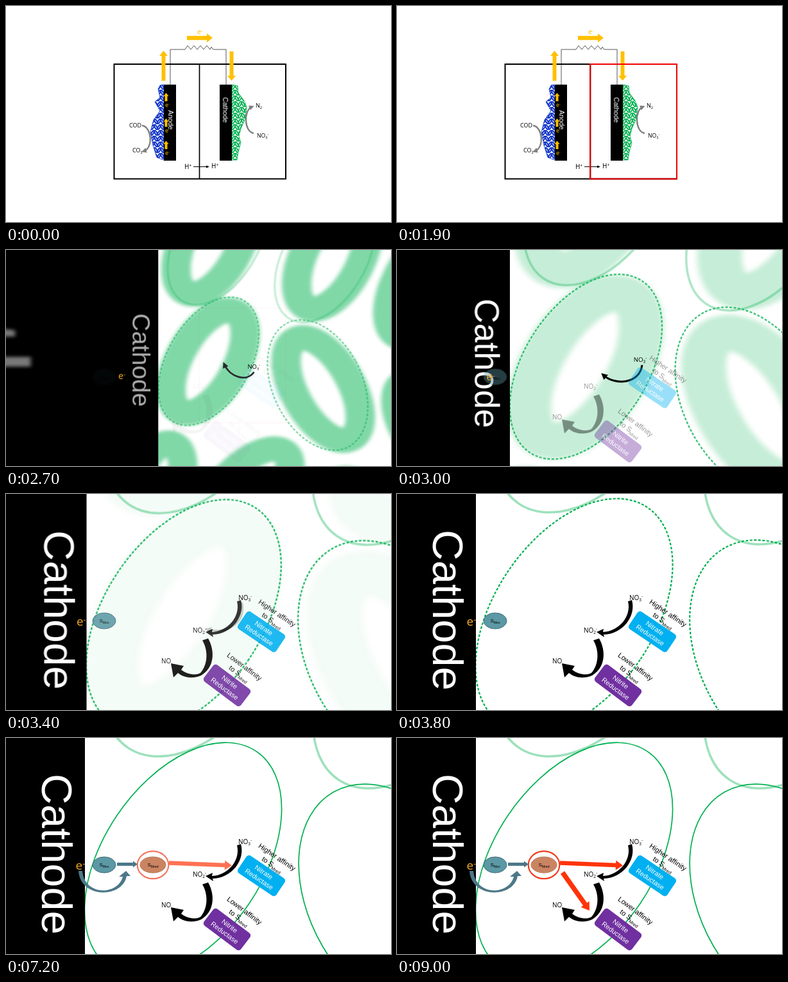
Recreate the animation shown at these times as an HTML page. Size 600 px wide and 338 px high, loop 9.1 s.

```html
<!DOCTYPE html>
<html lang="en">
<head>
<meta charset="utf-8">
<title>Cathode electron transfer</title>
<style>
html, body { margin: 0; width: 100%; height: 100%; overflow: hidden; background: #fff; }
svg { display: block; width: 600px; height: 338px; }
text { font-family: "Liberation Sans", Arial, sans-serif; }
.chem { font-family: "Open Sans", "Noto Sans", sans-serif; }
.sub { font-size: 65%; }
.orange { fill: #ffc000; }
.mid { text-anchor: middle; }
.anim { animation: 9.1s linear infinite; }

/* One shared zoom between two poses, 1900 to 3500 ms */
.morph { animation-name: morph; transform: var(--from); }
@keyframes morph {
  0%, 20.879% { transform: var(--from); animation-timing-function: cubic-bezier(.333, 0, .667, 1); }
  38.462%, 100% { transform: translate(0px, 0px) scale(1, 1); }
}
.zoom { --from: translate(351.6px, 139.8px) scale(.01495, .096); }
.block { --from: translate(350px, 165.5px) scale(.01595, .085); }
.name { --from: translate(329.2px, 133.8px) scale(.159); }
.nitrate { --from: translate(76px, 61.6px) scale(.87); }
.electron { --from: translate(187.5px, 95px) scale(.5); }

.old { animation-name: old; }
@keyframes old { 0%, 20.879% { opacity: 1; } 24.2%, 100% { opacity: 0; } }
.ghost { animation-name: ghost; }
@keyframes ghost { 0%, 20.879% { opacity: 1; } 26.374% { opacity: .2; } 29.67%, 100% { opacity: 0; } }
.frame { animation-name: frame; }
@keyframes frame {
  0%, .5% { opacity: 0; }
  7.692%, 20.879% { opacity: 1; stroke-width: 2; }
  26.374% { opacity: .6; stroke-width: .8; }
  30%, 100% { opacity: 0; stroke-width: .8; }
}
.blobs { animation-name: blobs; }
@keyframes blobs {
  0%, 20.879% { opacity: 0; }
  22.527% { opacity: .95; }
  26.374% { opacity: .77; }
  32.967% { opacity: .23; }
  38.462%, 100% { opacity: 0; }
}
.rims { animation-name: rims; }
@keyframes rims {
  0%, 20.879% { opacity: 0; }
  26.374% { opacity: .23; }
  32.967% { opacity: .85; }
  38.462%, 100% { opacity: 1; }
}
.crisp { animation-name: crisp; }
@keyframes crisp {
  0%, 43.95% { stroke-dasharray: 4 2.5; stroke-width: 2.2; }
  43.956%, 100% { stroke-dasharray: none; stroke-width: 1.7; }
}
.dim { animation-name: dim; }
@keyframes dim { 0%, 20.879% { opacity: 1; } 26.374% { opacity: .35; } 32.967%, 100% { opacity: 1; } }
.final { animation-name: final; }
@keyframes final { 0%, 29.3% { opacity: 0; } 38.462%, 100% { opacity: 1; } }
.glow { animation-name: glow; }
@keyframes glow { 0%, 20.879% { opacity: 0; } 25%, 100% { opacity: 1; } }
.bend { animation-name: bend; }
@keyframes bend {
  0%, 20.879% { d: path("M386 199C371 197 370 163 383 158"); stroke: #7f7f7f; stroke-width: 2.3; opacity: 1; }
  26.374% { d: path("M391 202C372 205 358 185 359 163"); stroke: #555; stroke-width: 2.5; }
  32.967% { d: path("M382 180C378 210 340 212 322 196"); stroke: #000; stroke-width: 3; opacity: 1; }
  38.462%, 100% { d: path("M364 167C374 200 345 222 313 216"); stroke: #000; stroke-width: 3; opacity: 0; }
}
.swoosh { animation-name: swoosh; }
@keyframes swoosh { 0%, 33.5% { opacity: 0; } 38.462%, 100% { opacity: 1; } }

/* Later fades */
.reduce { animation-name: reduce; }
@keyframes reduce { 0%, 55% { opacity: 0; } 59.9%, 100% { opacity: 1; } }
.upper { animation-name: upper; }
@keyframes upper { 0%, 74.2% { opacity: 0; } 81.3%, 100% { opacity: 1; } }
.lower { animation-name: lower; }
@keyframes lower { 0%, 91.76% { opacity: 0; } 98.3%, 100% { opacity: 1; } }
</style>
</head>
<body>
<svg viewBox="0 0 600 338">
  <defs>
    <pattern id="blueCells" width="10" height="9" patternUnits="userSpaceOnUse" patternTransform="translate(226 122)">
      <g fill="#fff" stroke="#1236c8" stroke-width="2">
        <ellipse cx="2.5" cy="4.5" rx="1.5" ry="4.2" transform="rotate(30 2.5 4.5)"/>
        <ellipse cx="7.5" cy="4.5" rx="1.5" ry="4.2" transform="rotate(-28 7.5 4.5)"/>
      </g>
    </pattern>
    <pattern id="greenCells" width="10" height="9" patternUnits="userSpaceOnUse" patternTransform="translate(352 122)">
      <g fill="#fff" stroke="#00b050" stroke-width="1.8">
        <ellipse cx="2.5" cy="4.5" rx="1.6" ry="4.1" transform="rotate(25 2.5 4.5)"/>
        <ellipse cx="7.5" cy="4.5" rx="1.6" ry="4.1" transform="rotate(-28 7.5 4.5)"/>
      </g>
    </pattern>
    <marker id="head" viewBox="0 0 10 10" refX="5" refY="5" markerWidth="3.4" markerHeight="3.4" orient="auto">
      <path d="M0 0L10 5L0 10Z" fill="context-stroke"/>
    </marker>
    <filter id="soft" x="-5%" y="-5%" width="110%" height="110%"><feGaussianBlur stdDeviation="1.5"/></filter>
  </defs>

  <rect width="600" height="338" fill="#fff"/>

  <!-- Overview of the cell -->
  <g class="anim old">
    <path d="M256 123V68H279L283 62L288 68L293 62L298 68L303 62L308 68L313 62L318 68L320 64L323 68H343V123" fill="none" stroke="#444" stroke-width=".9"/>
    <rect x="168.5" y="91" width="267.5" height="179.5" fill="none" stroke="#000" stroke-width="2"/>
    <path d="M301.5 91V270" stroke="#000" stroke-width="1.7"/>
    <g class="orange">
      <path data-arrow="245.5 117 245.5 70 6 13 8"/>
      <path data-arrow="351.5 71 351.5 117 6 13 8"/>
      <path data-arrow="282 50 322 50 6.5 14 9"/>
      <text class="chem" x="298" y="44" font-size="11">e<tspan class="sub" dy="-3">-</tspan></text>
    </g>
    <path d="M246 123L240 124L237 130L240 143L232 150L240 164L230 178L225 197L229 218L235 237L246 241Z" fill="url(#blueCells)" stroke="#1236c8" stroke-width=".8"/>
    <path d="M352 123L361 125L362 136L371 148L375 158L373 176L366 192L363 204L366 214L362 228L360 241L352 241Z" fill="url(#greenCells)" stroke="#00b050" stroke-width=".8"/>
    <rect x="246" y="123" width="19" height="119"/>
    <text transform="translate(253 163) rotate(90)" font-size="10.5" fill="#fff">Anode</text>
    <path d="M212 187C227 189 230 222 215 227" fill="none" stroke="#7f7f7f" stroke-width="2.3" marker-end="url(#head)"/>
    <g font-size="9">
      <text class="chem" x="192" y="190">COD</text>
      <text class="chem" x="197" y="229">CO<tspan class="sub" dy="2">2</tspan></text>
      <text class="chem" x="278" y="255" font-size="10">H<tspan class="sub" dy="-3">+</tspan></text>
      <text class="chem" x="320" y="254" font-size="10">H<tspan class="sub" dy="-3">+</tspan></text>
    </g>
    <path data-arrow="292 251.5 317 251.5 .9 4 5"/>
  </g>

  <!-- Biofilm close-up -->
  <g class="anim morph zoom">
    <g class="anim blobs">
      <g id="cells" transform="translate(-1110 -352) scale(4.107 3.27)" filter="url(#soft)" fill="none" stroke="#00b050">
        <path d="M440 -5C470 22 505 12 578 76L602 92M602 175C586 245 590 280 572 340" stroke-width="5"/>
      </g>
    </g>
    <g class="anim rims" fill="none" stroke="#00b050">
      <g stroke-width="3.5" opacity=".38">
        <ellipse class="rim" cx="304" cy="-154" rx="124" ry="204" transform="rotate(34 304 -154)"/>
        <ellipse class="rim" cx="632" cy="-104" rx="124" ry="204" transform="rotate(34 632 -104)"/>
      </g>
      <ellipse class="rim anim crisp" cx="276" cy="190" rx="124" ry="204" transform="rotate(34 276 190)"/>
      <ellipse class="rim anim crisp" cx="610" cy="258" rx="135" ry="200" transform="rotate(-30 610 258)"/>
    </g>
  </g>

  <!-- Cathode -->
  <rect class="anim morph block" x="-1068" y="-500" width="1191" height="1400"/>
  <g class="anim morph zoom">
    <g class="anim blobs">
      <g transform="translate(-1110 -352) scale(4.107 3.27)" filter="url(#soft)">
        <text transform="translate(96 5) scale(1 .644) rotate(90)" font-size="150" fill="#f0f0f0">Cathode</text>
      </g>
    </g>
  </g>
  <g class="anim dim">
    <g class="anim morph name">
      <text transform="translate(56 56) rotate(90)" font-size="66.5" fill="#fff">Cathode</text>
    </g>
  </g>

  <g class="anim ghost">
    <g class="orange">
      <path data-arrow="249.5 149 249.5 136 4 8 5"/>
      <path data-arrow="249.5 189 249.5 176 4 8 5"/>
      <path data-arrow="249.5 224 249.5 211 4 8 5"/>
      <g font-size="9">
        <text class="chem" x="248" y="158">e<tspan class="sub" dy="-3">-</tspan></text>
        <text class="chem" x="248" y="198">e<tspan class="sub" dy="-3">-</tspan></text>
        <text class="chem" x="248" y="233">e<tspan class="sub" dy="-3">-</tspan></text>
      </g>
    </g>
    <text class="chem" x="389" y="159" font-size="9">N<tspan class="sub" dy="2">2</tspan></text>
  </g>
  <rect class="anim frame" x="301" y="91" width="135" height="179.5" fill="none" stroke="#f00000" stroke-width="2"/>
  <path class="anim bend" d="M386 199C371 197 370 163 383 158" fill="none" marker-end="url(#head)"/>
  <text class="chem anim morph nitrate" x="362" y="166" font-size="10">NO<tspan class="sub" dy="2">3</tspan><tspan class="sub" dy="-6">-</tspan></text>

  <!-- Enzymes and reactions -->
  <g class="anim final">
    <g transform="translate(398 215.5) rotate(34)" font-size="10.6" fill="#fff" class="mid">
      <rect x="-36" y="-16.5" width="72" height="33" rx="5" fill="#00b0f0"/>
      <text y="-3">Nitrate</text><text y="10">Reductase</text>
      <g fill="#000" font-size="11">
        <text x="4" y="-34">Higher affinity</text>
        <text x="4" y="-20">to S<tspan class="sub" dy="3">Mred</tspan></text>
      </g>
    </g>
    <g transform="translate(344.5 299.5) rotate(37)" font-size="10.6" fill="#fff" class="mid">
      <rect x="-36" y="-16.5" width="72" height="33" rx="5" fill="#7030a0"/>
      <text y="-3">Nitrite</text><text y="10">Reductase</text>
      <g fill="#000" font-size="11">
        <text x="4" y="-36">Lower affinity</text>
        <text x="4" y="-22">to S<tspan class="sub" dy="3">Mred</tspan></text>
      </g>
    </g>
    <text class="chem" x="291" y="217" font-size="10">NO<tspan class="sub" dy="2">2</tspan><tspan class="sub" dy="-6">-</tspan></text>
    <text class="chem" x="242" y="265" font-size="10">NO</text>
    <path d="M306 229L315 226C326 245 325 272 304 284C290 290 276 287 268 280L261 287L257 265L277 269L273 275C283 283 296 284 303 280C314 268 316 246 306 229Z"/>
    <ellipse cx="153" cy="198.5" rx="18" ry="12.5" fill="#5c99a5" stroke="#3f6b77"/>
    <text class="mid" x="153" y="201" font-size="8">S<tspan class="sub" dy="1.5">Mox</tspan></text>
  </g>
  <path class="anim swoosh" d="M360 168L366 166C373 190 353 219 322 220L323 224L311 216L322 211L321 216C345 215 366 192 360 168Z"/>

  <g class="anim reduce">
    <ellipse cx="229" cy="198.5" rx="20" ry="12.5" fill="#cb8462" stroke="#b87454"/>
    <text class="mid" x="229" y="201" font-size="8">S<tspan class="sub" dy="1.5">Mred</tspan></text>
    <path data-arrow="173 197.5 205 197.5 5 10 7" fill="#4c7888"/>
    <path d="M113 208H119C122 247 174 247 182 217L176 217L187 208L194 216L188 216C182 251 116 252 113 208Z" fill="#4c7888"/>
  </g>
  <g class="anim glow">
    <text class="chem anim morph electron" x="108.5" y="206" font-size="19" fill="#f0a828">e<tspan class="sub" dy="-5">-</tspan></text>
  </g>

  <g class="anim upper" fill="#ff3309">
    <ellipse cx="229" cy="198.7" rx="24.3" ry="21.5" fill="none" stroke="#f23a1c" stroke-width="2.2"/>
    <path data-arrow="254 195.5 352 199.5 6.5 15 11"/>
  </g>
  <path class="anim lower" data-arrow="258 210.5 300 270 7.5 16 12" fill="#ff3309"/>
</svg>
<script>
const NS = "http://www.w3.org/2000/svg";

// Block arrow: x1 y1 x2 y2 shaft headWidth headLength
document.querySelectorAll("[data-arrow]").forEach(el => {
  const [x1, y1, x2, y2, shaft, wide, head] = el.dataset.arrow.split(" ").map(Number);
  const len = Math.hypot(x2 - x1, y2 - y1);
  const ux = (x2 - x1) / len, uy = (y2 - y1) / len;
  const at = (along, side) => `${x1 + ux * along - uy * side} ${y1 + uy * along + ux * side}`;
  const neck = len - head, s = shaft / 2, w = wide / 2;
  const points = [at(0, -s), at(neck, -s), at(neck, -w), at(len, 0), at(neck, w), at(neck, s), at(0, s)];
  el.setAttribute("d", "M" + points.join("L") + "Z");
});

document.querySelectorAll(".rim").forEach(el => el.setAttribute("vector-effect", "non-scaling-stroke"));

// Bacteria: centre x, centre y, tilt, size
const rings = [
  [340, 62, 22, 1], [430, 75, 22, 1], [498, 100, 22, 1], [563, 143, 20, 1],
  [337, 166, 24, 1], [423, 190, -24, 1], [502, 222, -25, .88], [365, 283, 36, 1],
  [300, 272, 15, .75], [457, 312, -27, 1], [535, 322, 27, 1], [303, 25, 25, .7]
];
const solids = [[565, 218, 25, 1], [410, 2, 10, .9], [372, 362, 20, 1]];
const cells = document.getElementById("cells");
function addCell([x, y, tilt, size], rx, ry, attrs) {
  const el = document.createElementNS(NS, "ellipse");
  const all = { cx: x, cy: y, rx: rx * size, ry: ry * size, transform: `rotate(${tilt} ${x} ${y})`, ...attrs };
  for (const key in all) el.setAttribute(key, all[key]);
  cells.append(el);
}
rings.forEach(c => addCell(c, 21.5, 48, { "stroke-width": 22 }));
solids.forEach(c => addCell(c, 21, 36, { fill: "#00b050", stroke: "none" }));
</script>
</body>
</html>
```
